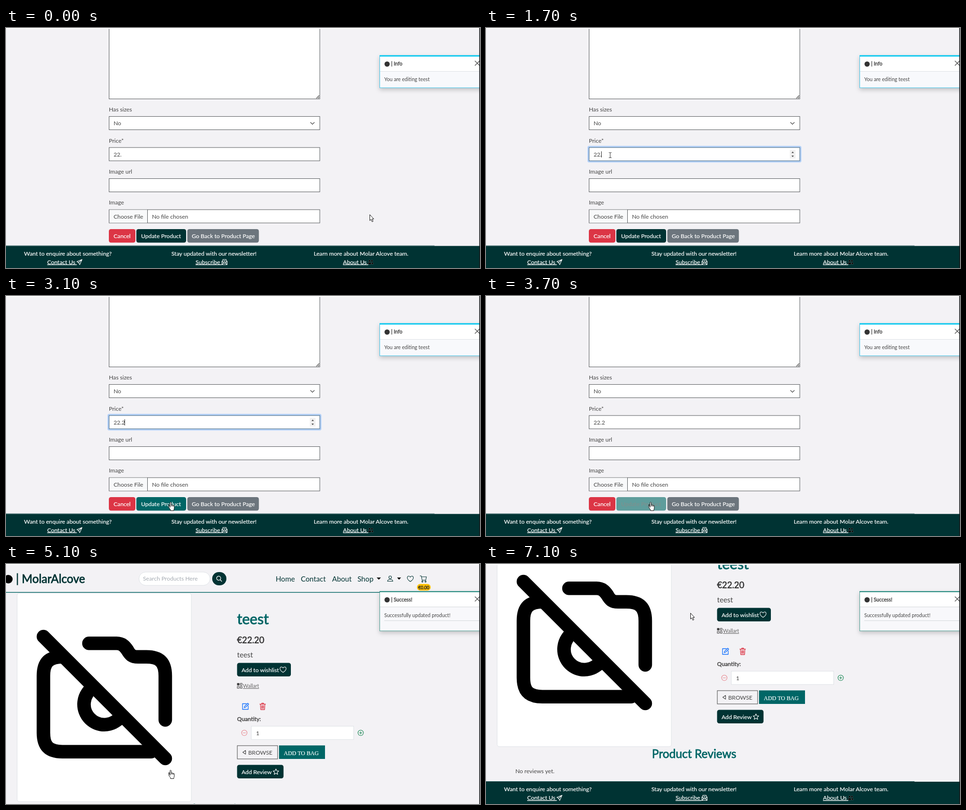
An HTML page that plays this animation: 1000x506 px, repeating every 7200 ms.

```html
<!DOCTYPE html>
<html lang="en">
<head>
<meta charset="utf-8">
<title>Product editing</title>
<style>
html, body { margin: 0; width: 100%; height: 100%; overflow: hidden; background: #f3f2f5; }
svg { display: block; }
text { font: 12.17px Lato, sans-serif; fill: currentColor; white-space: pre; }
#stage { color: #444; }
.small text, text.small { font-size: 10.65px; }
.lead { font-size: 15.2px; }
.bold { stroke: currentColor; stroke-width: .45px; }
.huge { font-size: 30.4px; stroke-width: .9px; }
.big { font-size: 24.35px; stroke-width: .8px; }
.price { font-size: 18.25px; stroke-width: .6px; color: #333; }
.teal { color: #006666; }
.dark { color: #003333; }
.light { color: #fff; stroke: #fff; stroke-width: .2px; }
.link { text-decoration: underline; }
.field { fill: #fff; stroke: #55585b; }
.soft { fill: #fff; stroke: #dee2e6; }
.icon { fill: none; stroke: currentColor; stroke-width: 1.1; stroke-linecap: round; stroke-linejoin: round; }
.toast { filter: drop-shadow(0 4px 5px #0003); }
.pointer { fill: #fff; stroke: #111; stroke-linejoin: round; }
</style>
</head>
<body>
<svg id="stage" width="1000" height="506" viewBox="0 0 1000 506">
  <defs>
    <path id="heart" d="M0 5.5C-9 0-7-6-3.500-6C-1.500-6-.5-5 0-3.800C.5-5 1.500-6 3.500-6C7-6 9 0 0 5.500Z"/>
    <g id="footer">
      <rect y="459.500" width="1000" height="60" fill="#003333"/>
      <path d="M0 459H904" stroke="#2f5f60"/>
      <g class="light">
        <text x="38" y="479.500">Want to enquire about something?</text>
        <text x="87" y="497.500" class="link">Contact Us </text>
        <text x="349" y="479.500">Stay updated with our newsletter!</text>
        <text x="400" y="497.500" class="link">Subscribe </text>
        <text x="749" y="479.500" text-anchor="middle">Learn more about Molar Alcove team.</text>
        <text x="711" y="497.500" class="link">About Us </text>
        <g class="icon">
          <path d="M160.500 488L149.500 492.500L153 494.500L155.500 499ZL153 494.500"/>
          <path d="M455.500 492V499H466.500V492L461 496ZL457.500 490V488H464.500V490L466.500 492M455.500 499L459.500 495M466.500 499L462.500 495M459.500 490.500H462.500M459.500 492.500H462.500"/>
        </g>
        <path d="M763.500 498Q763.500 494 767 494T771 498ZM771.500 498Q772 495 770.500 494.300Q775 493 775 498Z"/>
        <circle cx="767" cy="491" r="2.100"/><circle cx="772" cy="491" r="1.900"/>
      </g>
    </g>
  </defs>
  <rect width="1000" height="506" fill="#f3f2f5"/>

  <g id="form">
    <rect class="field" x="217.500" y="-20" width="444.500" height="169.500"/>
    <path class="icon" stroke-width=".8" d="M655 148L660.500 142.500M658.500 148L660.500 146"/>
    <text x="217" y="176">Has sizes</text>
    <rect class="field" x="217.500" y="186.500" width="444.500" height="28"/>
    <text x="227" y="205.300">No</text>
    <path class="icon" stroke-width="1.500" d="M642.500 199L646.500 203L650.500 199"/>
    <text x="217" y="241.500">Price*</text>
    <rect id="ring" x="216" y="250.500" width="447.500" height="31" rx="2" fill="none" stroke="#b3d1f8" stroke-width="4"/>
    <rect id="price" class="field" x="217.500" y="252" width="444.500" height="28"/>
    <text id="amount" x="227" y="270.500"></text>
    <path id="caret" d="M0 260V273" stroke="#222"/>
    <g id="spinner">
      <rect x="641" y="257" width="12" height="18" fill="#f0f0f0"/>
      <path d="M644.500 263.500L647 260.500L649.500 263.500ZM644.500 269L647 272L649.500 269Z" fill="#444"/>
    </g>
    <text x="217" y="306.800">Image url</text>
    <rect class="field" x="217.500" y="317.500" width="444.500" height="28"/>
    <text x="217" y="372.300">Image</text>
    <rect class="field" x="217.500" y="383" width="444.500" height="28"/>
    <rect x="218" y="383.500" width="80" height="27" fill="#f8f9fa"/>
    <path d="M298.500 383V411" stroke="#55585b"/>
    <text x="227" y="401.500">Choose File</text>
    <text x="308" y="401.500">No file chosen</text>
    <rect x="217" y="424" width="56" height="28.500" rx="4.500" fill="#dc3545"/>
    <rect id="update" x="275" y="424" width="105" height="28.500" rx="4.500"/>
    <rect x="382.500" y="424" width="151" height="28.500" rx="4.500" fill="#6c757d"/>
    <g class="light">
      <text x="227" y="442.500">Cancel</text>
      <text id="updateText" x="285" y="442.500">Update Product</text>
      <text x="392" y="442.500">Go Back to Product Page</text>
    </g>
    <use href="#footer"/>
  </g>

  <g id="product">
    <g class="dark">
      <circle cx="5" cy="32" r="9"/>
      <text class="bold big" x="21" y="39.500">| MolarAlcove</text>
      <rect class="soft" x="280.500" y="17" width="150" height="28" rx="14"/>
      <text x="289" y="35.300" style="color:#a5abb2">Search Products Here</text>
      <rect x="435" y="17" width="30" height="28" rx="14" fill="#003333"/>
      <path class="icon light" style="stroke-width:1.300px" d="M451.500 33L455 36.500M453 30A4.300 4.300 0 1 1 444.400 30A4.300 4.300 0 1 1 453 30"/>
      <g class="lead">
        <text class="lead" x="569" y="36.500">Home</text>
        <text class="lead" x="622" y="36.500">Contact</text>
        <text class="lead" x="688" y="36.500">About</text>
        <text class="lead" x="741.500" y="36.500">Shop</text>
      </g>
      <path d="M782 28.500H791L786.500 33ZM825 28.500H833.500L829.200 33Z"/>
      <g class="icon">
        <circle cx="810.500" cy="28" r="2.800"/>
        <path d="M805 36.500Q805 32.500 810.500 32.500T816 36.500Z"/>
        <use href="#heart" x="853" y="31.500"/>
        <path d="M873.500 25H876L878 34H885.500L887 27H876.500"/>
        <circle cx="878.500" cy="37" r="1.400"/><circle cx="885" cy="37" r="1.400"/>
      </g>
      <rect x="867" y="42" width="29" height="14" rx="7" fill="#ffc107"/>
      <text class="bold" x="881.500" y="52.500" text-anchor="middle" style="font-size:9.130px;color:#222">€0.00</text>
      <path d="M0 59.800H1000" stroke="#0b6b69" stroke-width="1.500"/>
    </g>

    <rect class="soft" x="23.500" y="61.500" width="367.500" height="439.500" rx="4.500"/>
    <g transform="translate(207.500 281.500) scale(14.280) translate(-12 -12)" fill="none" stroke="#000" stroke-width="2" stroke-linecap="round">
      <path d="M3 3L21 21M10.440 10.440A3 3 0 1 0 14.560 14.560"/>
      <path d="M9.720 4H13.800C14.600 4 15 4.400 15.400 5C15.800 5.700 16.100 6 17 6H18.200C20.200 6 21 6.800 21 8.800V15.300"/>
      <path d="M5.900 6C3.800 6 3 6.800 3 8.800V17.200C3 19.200 3.800 20 5.800 20H18.900"/>
    </g>

    <text class="bold huge teal" x="487.500" y="127">teest</text>
    <text class="bold price" x="487.500" y="166.500">€22.20</text>
    <text class="lead" x="487.500" y="196.500">teest</text>
    <g fill="#003333">
      <rect x="487.500" y="208.500" width="113.500" height="28.500" rx="4.500"/>
      <rect x="487.500" y="423.500" width="98" height="28.500" rx="4.500"/>
    </g>
    <rect x="576" y="382.500" width="97" height="28.500" fill="#006666"/>
    <g class="light">
      <text x="497" y="227.500">Add to wishlist</text>
      <use href="#heart" x="584.500" y="223" class="icon"/>
      <text x="586" y="402.500" style="font-family:'Liberation Serif',serif">ADD TO BAG</text>
      <text x="497" y="442.500">Add Review</text>
      <path class="icon" d="M569.500 432L571.300 436L575.500 436.400L572.300 439.300L573.200 443.500L569.500 441.300L565.800 443.500L566.700 439.300L563.500 436.400L567.700 436Z"/>
    </g>
    <g class="icon">
      <path fill="#444" d="M488 251.500H492V255.500H488Z"/>
      <path d="M494.500 251.500H498V255.500H494.500ZM488 258H492V262H488ZM494.500 258H498V262H494.500Z"/>
      <path d="M505.500 393L499.500 397L505.500 401Z"/>
    </g>
    <text class="small link" x="500" y="261" style="color:#666">Wallart</text>
    <g class="icon" style="stroke-width:1.300px">
      <path stroke="#0d6efd" d="M507 294.500H499V306.500H511V299M502.500 303L503.500 300L510 293.500L512 295.500L505.500 302Z"/>
      <path stroke="#dc3545" d="M535.500 295.500H547.500M539.500 295V293.500H543.500V295M536.800 296L537.500 307H545.500L546.200 296M539.500 298.500V304.500M541.500 298.500V304.500M543.500 298.500V304.500"/>
    </g>
    <text class="bold" x="487.500" y="331.300">Quantity:</text>
    <rect class="soft" x="517.500" y="342" width="216" height="28"/>
    <text x="527.500" y="360.500">1</text>
    <g class="icon">
      <g stroke="#e8868e"><circle cx="502.800" cy="356" r="5.700"/><path d="M500 356H505.500"/></g>
      <g stroke="#198754"><circle cx="748.300" cy="356" r="5.700"/><path d="M745.500 356H751M748.300 353.200V358.800"/></g>
    </g>
    <rect x="488" y="383" width="85" height="28" fill="none" stroke="#444"/>
    <text x="511" y="401.500">BROWSE</text>
    <text class="bold big teal" x="350" y="525">Product Reviews</text>
    <text x="62" y="557.300">No reviews yet.</text>
    <use href="#footer" y="115.500"/>
  </g>

  <g id="info" class="toast small">
    <rect x="788.500" y="58" width="220" height="68" fill="#f8f9fc" stroke="#3cc4ea"/>
    <rect x="789" y="60" width="220" height="31" fill="#fff"/>
    <path d="M788 58.800H1000" stroke="#0dcaf0" stroke-width="2.800"/>
    <path d="M789 91.500H1000" stroke="#dde1e6"/>
    <circle cx="804" cy="76" r="5.500" fill="#333"/>
    <text class="bold" x="812.500" y="79">| Info</text>
    <path class="icon" d="M989.500 69.500L999 79M999 69.500L989.500 79"/>
    <text x="798" y="112.300">You are editing teest</text>
  </g>
  <g id="success" class="toast small">
    <rect x="788.500" y="58" width="220" height="83" fill="#f8f8fb" stroke="#4a9d93"/>
    <rect x="789" y="59" width="220" height="31" fill="#fff"/>
    <path d="M788 58.300H1000" stroke="#0f7f72" stroke-width="1.800"/>
    <path d="M789 90.500H1000M798 119.500H1000" stroke="#d5d8dc"/>
    <circle cx="804" cy="75.500" r="5.500" fill="#333"/>
    <text class="bold" x="812.500" y="78.500">| Success!</text>
    <path class="icon" d="M989.500 69L999 78.500M999 69L989.500 78.500"/>
    <text x="798" y="111.800">Successfully updated product!</text>
  </g>

  <rect width="1000" height="2" fill="#fff"/>
  <rect x="998.500" width="2" height="506" fill="#15181a"/>

  <g id="cursor">
    <path id="arrow" class="pointer" d="M.5.5V13L3.300 10.500L5.300 15.500L7.500 14.500L5.400 9.700H9Z"/>
    <path id="beam" class="icon" d="M-2.500-5.500Q0-5.500 0-4.500Q0-5.500 2.500-5.500M0-4.500V4.500M-2.500 5.500Q0 5.500 0 4.500Q0 5.500 2.500 5.500"/>
    <path id="hand" class="pointer" d="M0 1.500Q1.300-.5 2.500 1.500V6.500Q4 5.500 4.800 7Q6.400 6 7 7.600Q8.800 7 9 9V13Q9 15 8 16.500V18.500H1V16.500L-2.700 11.500Q-3-.5 0 11.500Z M2.500 6.500V9.500M4.800 7V9.700M7 7.600V10"/>
  </g>
</svg>
<script>
const LOOP = 7200, STEP = 100;
const FOCUS = 1700, TYPE = 2100, HOVER = 2700, PRESS = 3500, SAVED = 4000, LEAVE = 5800;
const path = [
  [300, 767, 393], [400, 752, 391], [600, 640, 378], [800, 485, 359], [1000, 345, 300],
  [1150, 300, 276], [1500, 262, 268], [2200, 262, 268], [2400, 325, 349],
  [2600, 343, 412], [2800, 346, 434], [5700, 346, 434], [6000, 385, 270],
  [6200, 420, 150], [6400, 431, 103]
];
const el = {};
document.querySelectorAll("[id]").forEach(node => el[node.id] = node);

const clamp = v => Math.min(1, Math.max(0, v));
const show = (node, on) => { node.style.display = on ? "" : "none"; };

function cursorAt(t) {
  const next = path.findIndex(p => p[0] > t);
  if (next === 0) return path[0].slice(1);
  if (next < 0) return path[path.length - 1].slice(1);
  const [t0, x0, y0] = path[next - 1], [t1, x1, y1] = path[next];
  const k = (t - t0) / (t1 - t0);
  return [x0 + (x1 - x0) * k, y0 + (y1 - y0) * k];
}

function draw(t) {
  const saved = t >= SAVED, focused = t >= FOCUS && t < PRESS, typed = t >= TYPE;
  show(el.form, !saved);
  show(el.info, !saved);
  show(el.product, saved);
  show(el.success, saved);

  show(el.ring, focused);
  el.price.style.stroke = focused ? "#3f6078" : "";
  show(el.spinner, focused || (t >= 1200 && t < FOCUS));
  el.amount.textContent = typed ? "22.2" : "22.";
  show(el.caret, focused && (!typed || Math.floor((t - TYPE) / 500) % 2 === 0));
  el.caret.setAttribute("transform", `translate(${typed ? 250.5 : 243.5})`);
  const pressed = t >= PRESS;
  el.update.style.fill = pressed ? "#5f9d9c" : t >= HOVER ? "#006666" : "#003333";
  el.updateText.style.cssText = pressed ? "color:#7f918f;stroke:#7f918f" : "";

  const k = clamp((t - 5100) / 200);
  el.product.setAttribute("transform", `translate(0 ${-116 * k * k * (3 - 2 * k)})`);
  el.success.style.opacity = clamp((t - SAVED) / 300);

  const beam = t >= 1100 && t < 2500, hand = t >= HOVER && t < LEAVE;
  show(el.beam, beam);
  show(el.hand, hand);
  show(el.arrow, !beam && !hand);
  el.cursor.setAttribute("transform", `translate(${cursorAt(t)})`);
}

function tick() {
  draw(Math.floor(performance.now() % LOOP / STEP) * STEP);
  requestAnimationFrame(tick);
}
tick();
</script>
</body>
</html>
```
